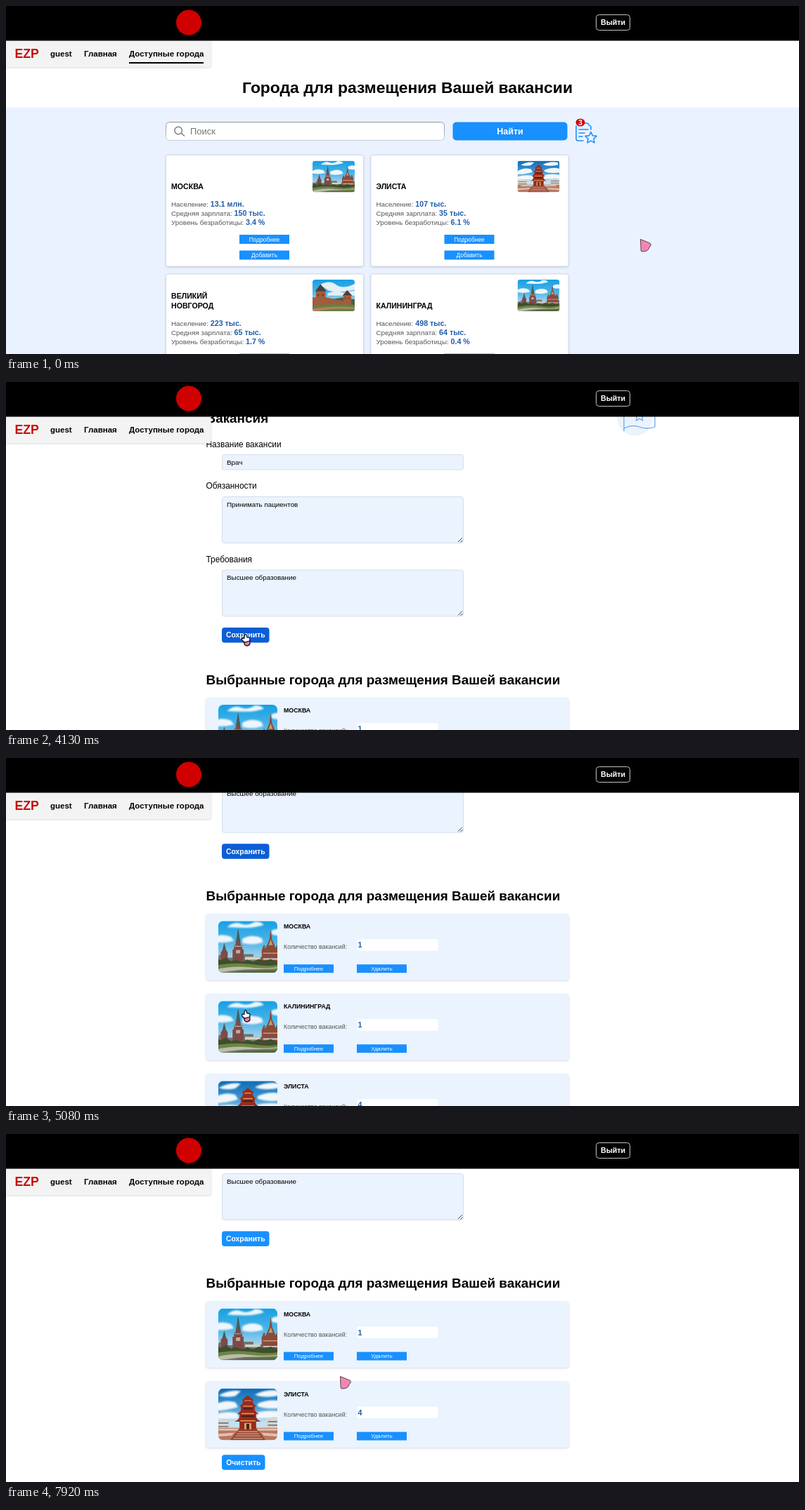
An HTML page for the animation above (7990 ms loop, 1128 by 496 pixels).

```html
<!DOCTYPE html>
<html lang="ru">
<head>
<meta charset="utf-8">
<title>Города для размещения вакансии</title>
<style>
  html, body { margin: 0; width: 100%; height: 100%; overflow: hidden; background: #fff; }
  svg { display: block; }
  text { font-family: "Liberation Sans", Arial, sans-serif; fill: #000; white-space: pre; }
  .b { font-weight: 700; }
  .w { fill: #fff; }
  .mid { text-anchor: middle; }
  .grey { fill: #555; }
  .hint { fill: #757575; }
  .brand { fill: #cc0a0a; }
  .value { fill: #1e5cab; font-weight: 700; font-size: 10.7px; }
  .btn { fill: #1890ff; }
  .field { fill: #eaf3fe; stroke: #d6dee8; }
  .card { filter: drop-shadow(0 1.5px 1.5px rgba(40, 60, 100, .2)); }
  .line { fill: none; stroke: #1890ff; stroke-width: 1.6; stroke-linejoin: round; stroke-linecap: round; }
  .flag { fill: none; stroke: #6aa9ea; stroke-width: 1.3; stroke-linejoin: round; }
</style>
</head>
<body>
<svg id="stage" width="1128" height="496" viewBox="0 0 1128 496">
  <defs>
    <linearGradient id="sky" x2="0" y2="1"><stop stop-color="#14a0e4"/><stop offset=".4" stop-color="#4db4e6"/><stop offset=".75" stop-color="#b5d9ee"/></linearGradient>
    <linearGradient id="deepSky" x2="0" y2="1"><stop stop-color="#0f6cb4"/><stop offset=".35" stop-color="#3f97d3"/><stop offset=".65" stop-color="#c4e0f1"/></linearGradient>
    <linearGradient id="searchEdge" x2="0" y2="1"><stop stop-color="#8b949e"/><stop offset="1" stop-color="#c3ccd6"/></linearGradient>
    <filter id="soft"><feGaussianBlur stdDeviation="1.3"/></filter>
    <clipPath id="clipSmall"><rect width="60" height="45" rx="4"/></clipPath>
    <clipPath id="clipLarge"><rect width="84" height="74" rx="7"/></clipPath>

    <symbol id="moscow" viewBox="0 0 100 75" preserveAspectRatio="xMidYMid slice">
      <path fill="url(#sky)" d="M0 0h100v75H0z"/>
      <path fill="#eef6fb" filter="url(#soft)" d="M20 9q10-9 20-5t20-3q10 0 13 5q-14 4-24 4t-29-1zM0 24q12-7 26-1l4 6q-18 4-30 1zM42 26q14-8 28-1l2 6q-16 5-30 1zM84 14q8-4 16-2v9q-9 1-16-2z"/>
      <path fill="#72756a" d="M0 52h8v-3h12v4h20v-5h18v4h16v-3h26v26H0z"/>
      <path fill="#7d4a48" d="M28 62V41h2v-6h2l1.500-9L36 11l2.500 15L40 35h2v6h2v21zM11 60V45l2-2 3-11 3 11 2 2v15z"/>
      <path fill="#3c6461" d="M33 30l3-18 3 18zM14 42l2-10 2 10z"/>
      <path fill="#c7a995" d="M33 42h6v5h-6zM30 36h12v1.200H30z"/>
      <path fill="#8a4a3f" d="M70 60V42l3-7 2 5 3-6 3-7 2-15 2 15 3 7 2 5 3-6 4 8v19z"/>
      <path fill="#3f7a70" d="M71.500 38q2-7 4 0zM77 36q2-7 4 0zM91 38q2.500-8 5 0z"/>
      <path fill="#c99c62" d="M80 35l3-8 3 8zM72 46h24v1.500H72z"/>
      <path fill="#d3d2cb" d="M46 52h22v4H46zM72 54h25v2H72z"/>
      <path fill="#3d4f2c" d="M0 58l5-4 6 3 7-4 8 5 6-2 10 3 7-3 9 3 8-4 8 3 9-3 8 4 9-2v14H0z"/>
      <path fill="#6f8345" d="M0 65q30-6 58-2t42-2v10H0z"/>
      <path fill="#b9bda9" d="M0 71q28-7 52-4t48-1v2q-28 2-45 2T8 75H0z"/>
      <path fill="#53683a" d="M24 75q22-4 76-3v3z"/>
    </symbol>

    <symbol id="elista" viewBox="0 0 100 75" preserveAspectRatio="xMidYMid slice">
      <path fill="url(#deepSky)" d="M0 0h100v75H0z"/>
      <path fill="#f1f7fb" filter="url(#soft)" d="M8 10q16-9 32-6l-8 7q-14 3-24-1zM60 9q18-9 36-5v6q-22 5-36-1zM0 25q16-10 32-5l4 7q-20 6-36 5zM64 22q18-8 36-3v9q-22 3-36-2zM0 38q20-6 36-2v8H0zM62 35q18-5 38-1v9H62z"/>
      <path fill="#d5d6d3" d="M0 46l14-2 10 3v13H0zM76 44l12-3 12 2v17H76z"/>
      <path fill="#78868d" d="M2 49h20v2H2zM2 54h20v2H2zM79 47h20v2H79zM79 52h20v2H79z"/>
      <path fill="#b77863" d="M0 57h100v18H0z"/>
      <path fill="#982b1e" d="M38 60V48h-7q5-2 7-6v-5h-4q5-3 6-6v-5h-2q4-3 5-6v-3h-2l9-7 9 7h-2v3q1 3 5 6h-2v5q1 3 6 6h-4v5q2 4 7 6h-7v12z"/>
      <path fill="#e0a05a" d="M39 46h22v1.500H39zM41 35.500h18V37H41zM43 25h14v1.300H43zM45 17h10v1.200H45zM45 50h10v10H45z"/>
      <path fill="#4d211c" d="M41 39h18v2.500H41zM43 28h14v2.500H43zM48 51h4v9h-4z"/>
      <path fill="#97432f" d="M37 59h26l13 16H24z"/>
      <path fill="#e1c0ac" d="M8 58h28v3H8zM64 58h28v3H64zM36 62h28v1H36zM34 65h32v1H34zM32 68h36v1H32zM29 71.500h42v1H29zM0 66l30-2-3 4-27 2zM70 64l30 2v4l-27-2z"/>
    </symbol>

    <symbol id="novgorod" viewBox="0 0 100 75" preserveAspectRatio="xMidYMid slice">
      <path fill="url(#sky)" d="M0 0h100v75H0z"/>
      <path fill="#e4eff6" filter="url(#soft)" d="M18 12q22-12 38 0t44-2v14q-40 9-62 2zM36 32q20-8 36-1l28-5v12H36z"/>
      <path fill="#4d6036" d="M0 48l30-6 20 4 24-4 26 5v28H0z"/>
      <path fill="#a35c3c" d="M8 62V28h23v14l42 9V38h19v24zM0 42h10v20H0z"/>
      <path fill="#533c33" d="M6 28l13-17 14 17zM71 38l11-13 12 13zM12 34h3v5h-3zM23 34h3v5h-3zM77 42h2v4h-2zM85 42h2v4h-2z"/>
      <path fill="#66803f" d="M0 62q40-6 100-2v15H0z"/>
      <path fill="#b08062" d="M0 69q50-8 100-3v4q-50-3-90 5H0z"/>
    </symbol>
  </defs>

  <g id="cityPage"></g>
  <g id="jobPage"></g>
  <g id="header"></g>
  <g id="cursors">
    <path id="arrow" fill="#f286b2" stroke="#5b4450" stroke-linejoin="round" d="M.5.5L14 6q2 1 1 3.500L13 12q-1 6-10 6-1.800 0-1.800-2z"/>
    <g id="hand" stroke="#15131f" stroke-width="1.300" stroke-linejoin="round">
      <path fill="#fff" d="M-1 4L-4 1q-1.200-3 1.200-3l1.600.5L-.7-6q1-2.500 2.600-.5L3-3q4-.5 4 2.500L6.500 3z"/>
      <path fill="#ee7fa9" d="M-1.500 4.500L6.500 2 7 6.500q-4 4.500-7.500 1z"/>
    </g>
    <path id="resize" fill="#e27fa6" stroke="#6b4656" stroke-width=".8" d="M0-8.500L2.300-3h-4.600zM0 8.500L2.300 3h-4.600z"/>
    <path id="beam" fill="none" stroke="#6b4656" d="M-2.500-6.500h5M0-6.500v13M-2.500 6.500h5"/>
  </g>
</svg>
<script>
const LOOP = 7990;
const $ = id => document.getElementById(id);

const text = (x, y, size, str, cls = '') =>
  `<text x="${x}" y="${y}" font-size="${size}" class="${cls}">${str}</text>`;
const rect = (x, y, w, h, rx, attrs) =>
  `<rect x="${x}" y="${y}" width="${w}" height="${h}" rx="${rx}" ${attrs}/>`;
const button = (x, y, w, h, size, label, { rx = 0, bold = '', id = '' } = {}) =>
  rect(x, y, w, h, rx, `class="btn"${id && ` id="${id}"`}`) +
  text(x + w / 2, y + h / 2 + size * .36, size, label, `w mid ${bold}`);
const photo = (name, x, y, w, h, clip) =>
  `<g transform="translate(${x} ${y})" clip-path="url(#${clip})"><use href="#${name}" width="${w}" height="${h}"/></g>`;
const star = (cx, cy, r) => 'M' + Array.from({ length: 10 }, (_, i) => {
  const a = i * Math.PI / 5, d = i % 2 ? r * .48 : r;
  return `${(cx + d * Math.sin(a)).toFixed(1)} ${(cy - d * Math.cos(a)).toFixed(1)}`;
}).join('L') + 'z';

function cityCard(col, row, name, image, people, salary, jobless) {
  const lines = name.split('|');
  const stats = [['Население', people], ['Средняя зарплата', salary], ['Уровень безработицы', jobless]];
  return `<g transform="translate(${227 + col * 291.5} ${212 + row * 169.5})">` +
    rect(.5, .5, 281, 158.5, 2.5, 'fill="#fff" stroke="#d5dbe5" class="card"') +
    photo(image, 209, 8.5, 60, 45, 'clipSmall') +
    lines.map((s, i) => text(8, 49 - 13.3 * (lines.length - 1 - i), 10.6, s, 'b')).join('') +
    stats.map(([k, v], i) =>
      text(8, 74 + 13.2 * i, 9.85, `${k}: <tspan class="value">${v}</tspan>`, 'grey')).join('') +
    button(105, 114, 71, 13, 8.4, 'Подробнее') +
    button(105, 136.5, 71, 13, 8.4, 'Добавить') + '</g>';
}

$('cityPage').innerHTML =
  rect(0, 144.5, 1128, 352, 0, 'fill="#ebf2ff"') +
  text(571, 124, 22.9, 'Города для размещения Вашей вакансии', 'b mid') +
  rect(227.5, 165.5, 396, 26, 5, 'fill="#fff" stroke="url(#searchEdge)"') +
  '<path d="M249 181l5 4.5M250.5 177.5a5.3 5.3 0 1 1-10.6 0a5.3 5.3 0 1 1 10.6 0" fill="none" stroke="#757b82" stroke-width="1.4"/>' +
  text(262, 182.7, 13, 'Поиск', 'hint') +
  button(635.5, 165.5, 163, 26, 12.5, 'Найти', { rx: 5, bold: 'b' }) +
  `<path class="line" d="M811 171v18q0 3 3 3h7M823 167h4l5 5v4M815 176h13M815 181h8M815 186h5"/>
   <path class="line" d="${star(832, 188, 8.5)}"/>
   <ellipse cx="817" cy="166" rx="6.5" ry="5.5" fill="#d00000"/>` +
  text(817, 169.5, 10, '3', 'b w mid') +
  cityCard(0, 0, 'МОСКВА', 'moscow', '13.1 млн.', '150 тыс.', '3.4 %') +
  cityCard(1, 0, 'ЭЛИСТА', 'elista', '107 тыс.', '35 тыс.', '6.1 %') +
  cityCard(0, 1, 'ВЕЛИКИЙ|НОВГОРОД', 'novgorod', '223 тыс.', '65 тыс.', '1.7 %') +
  cityCard(1, 1, 'КАЛИНИНГРАД', 'moscow', '498 тыс.', '64 тыс.', '0.4 %');

const area = y => rect(307.5, y + .5, 343, 66, 3, 'class="field"') +
  `<path d="M643 ${y + 65}l6-6M646.5 ${y + 65.5}l3-3" stroke="#444" fill="none"/>`;

const jobCard = (id, name, image, count) =>
  `<g id="${id}">` +
  rect(284.5, 0, 516, 94.5, 4, 'fill="#eaf3fe" class="card"') +
  photo(image, 302, 10, 84, 74, 'clipLarge') +
  text(395, 21, 8.8, name, 'b') +
  text(395, 50.3, 8.85, 'Количество вакансий:', 'grey') +
  rect(499, 36, 115.5, 16.5, 3, 'fill="#fff"') +
  text(500.5, 48, 10.7, count, 'value') +
  button(395, 72, 71, 12, 8, 'Подробнее') +
  button(499, 72, 71, 12, 8, 'Удалить', { id: id + 'Delete' }) + '</g>';

$('jobPage').innerHTML =
  `<circle cx="894.5" cy="51.5" r="25" fill="#eaf3fe"/>
   <path class="flag" d="M879 70V33q11-6 22 0t22-1v32q-11 4-22 0t-22 2"/>
   <path class="flag" d="${star(901, 48.5, 8)}"/>` +
  text(284.5, 58, 18.9, 'Вакансия', 'b') +
  text(284.5, 92.5, 11.9, 'Название вакансии') +
  rect(307.5, 103.5, 343, 21.5, 3, 'class="field"') +
  text(314, 117.8, 9.85, 'Врач') +
  text(284.5, 152, 11.9, 'Обязанности') +
  area(163) + text(314, 177.5, 9.85, 'Принимать пациентов') +
  text(284.5, 256.5, 11.9, 'Требования') +
  area(267.5) +
  '<g id="focusRing" fill="none">' +
  rect(306, 266.5, 346, 69, 4, 'stroke="#0d6efd" stroke-opacity=".25" stroke-width="2"') +
  rect(307.5, 268, 343, 66, 3, 'stroke="#86b7fe"') + '</g>' +
  text(314, 281.9, 9.85, '<tspan id="answer"></tspan>') +
  button(307, 350, 67.5, 21.5, 10.4, 'Сохранить', { rx: 4, bold: 'b', id: 'save' }) +
  text(284.5, 430.5, 18.9, 'Выбранные города для размещения Вашей вакансии', 'b') +
  jobCard('first', 'МОСКВА', 'moscow', 1) +
  jobCard('second', 'КАЛИНИНГРАД', 'moscow', 1) +
  jobCard('third', 'ЭЛИСТА', 'elista', 4) +
  '<g id="clear">' + button(307, 0, 61.5, 21.5, 10.4, 'Очистить', { rx: 4, bold: 'b' }) + '</g>';

$('header').innerHTML =
  rect(0, 49, 291.5, 38, 0, 'fill="#f3f3f3" class="card"') +
  rect(0, 0, 1128, 49.5, 0, 'fill="#000"') +
  '<circle cx="260" cy="23.5" r="18" fill="#d00000"/>' +
  rect(839.5, 12.5, 48, 22, 4, 'fill="none" stroke="#c4c4c4"') +
  text(863.5, 27.2, 10.6, 'Выйти', 'b w mid') +
  text(12.5, 74, 17.7, 'EZP', 'b brand') +
  text(63, 72, 11.5, 'guest', 'b') +
  text(111, 72, 11.5, 'Главная', 'b') +
  text(175, 72, 11.5, 'Доступные города', 'b') +
  rect(175, 80, 106, 2, 0, 'id="underline"');

// Each key is [time, ...values]; equal times make a jump.
const SCROLL = [[0, -70], [1680, -70], [1880, 0], [4330, 0], [4870, 190.5], [5150, 240],
  [5220, 250], [5560, 310], [6370, 310], [6370, 238], [7650, 238], [7790, 228], [7920, 211.5], [LOOP, 203]];
const POINTER = [[0, 902, 332], [60, 902, 332], [420, 850, 235], [820, 818, 173], [2080, 818, 173],
  [2080, 615, 232], [2350, 450, 275], [2620, 380, 300], [3420, 380, 300], [3950, 340, 367],
  [5220, 340, 367], [5560, 516, 346], [5640, 516, 346], [5970, 527, 330], [6720, 527, 330],
  [7250, 475, 345], [LOOP, 475, 345]];
const KINDS = [[0, 'arrow'], [750, 'hand'], [950, 'arrow'], [2080, 'resize'], [2150, 'arrow'], [2300, 'beam'],
  [3720, 'arrow'], [3860, 'hand'], [5220, 'arrow'], [5480, 'hand'], [6370, 'arrow']];
const FOCUS = [[0, 0], [2480, 0], [2620, 1], [3980, 1], [4120, 0], [LOOP, 0]];

function at(keys, t) {
  const i = keys.findIndex(k => k[0] > t);
  const a = keys[i - 1], b = keys[i], p = (t - a[0]) / (b[0] - a[0]);
  return a.slice(1).map((v, n) => v + (b[n + 1] - v) * p);
}
const show = (id, on) => { $(id).style.display = on ? '' : 'none'; };
const move = (id, x, y) => $(id).setAttribute('transform', `translate(${x} ${y})`);
const tint = (id, on, color) => { $(id).style.fill = on ? color : ''; };
const slot = n => Math.round(449.7 + 114.3 * n);

function draw() {
  const t = performance.now() % LOOP;
  const onCities = t < 950, removed = t >= 6370;
  show('cityPage', onCities);
  show('underline', onCities);
  show('jobPage', !onCities);

  const last = slot(removed ? 1 : 2);
  move('jobPage', 0, -at(SCROLL, t)[0]);
  move('first', 0, slot(0));
  move('second', 0, slot(1));
  move('third', 0, last);
  move('clear', 0, last + 104.6);
  show('second', !removed);

  $('answer').textContent = t < 3020 ? '' : t < 3150 ? 'Высшее' : 'Высшее образование';
  $('focusRing').style.opacity = at(FOCUS, t)[0];
  tint('save', t >= 3860 && t < 5220, '#0b5ed7');
  tint('secondDelete', t >= 6040, '#0b6fd0');

  const kind = KINDS.filter(k => k[0] <= t).pop()[1];
  for (const id of ['arrow', 'hand', 'resize', 'beam']) show(id, id === kind);
  move('cursors', ...at(POINTER, t));
  requestAnimationFrame(draw);
}
draw();
</script>
</body>
</html>
```
